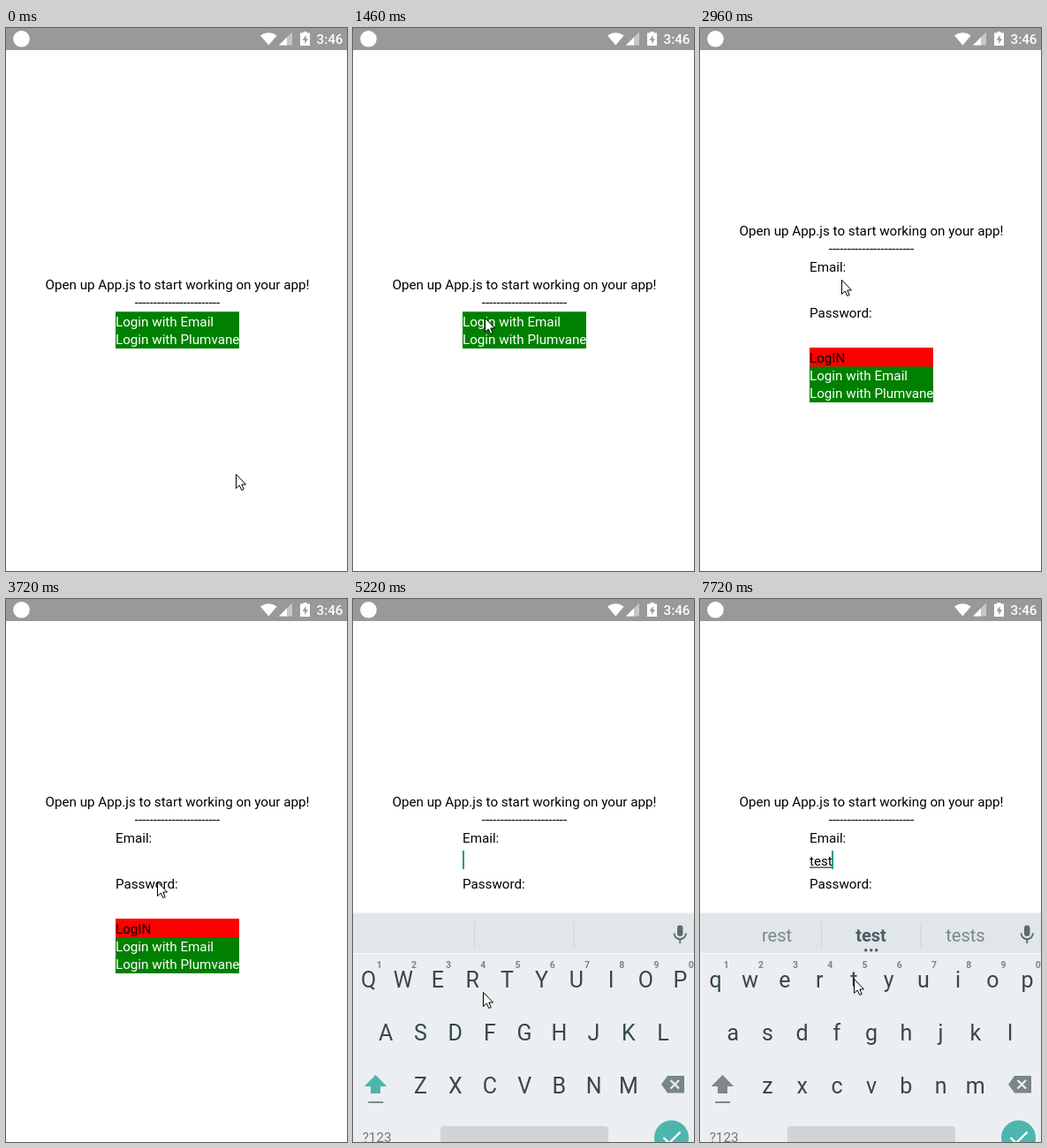
Write an HTML page that moves like this. It is 386 px wide and 615 px high and loops after 8000 ms.

```html
<!DOCTYPE html>
<html lang="en">
<head>
<meta charset="utf-8">
<title>Login form</title>
<style>
html, body { margin: 0; width: 100%; height: 100%; overflow: hidden; background: #fff; }
svg { display: block; width: 386px; height: 615px; font-family: Roboto, sans-serif; font-size: 15.2px; }
.mid { text-anchor: middle; }
.key { font-size: 25px; fill: #37474f; }
.hint { font-size: 10.5px; font-weight: 700; fill: #78868d; }
.word { font-size: 20px; fill: #78868d; }
</style>
</head>
<body>
<svg viewBox="0 0 386 615">
  <rect width="386" height="615" fill="#fff"/>

  <g id="status" fill="#fff">
    <rect width="386" height="25" fill="#999"/>
    <circle cx="17.5" cy="12.3" r="9.3"/>
    <path d="M288 8.500Q297.300 2 306.600 8.500L297.300 19.500Z"/>
    <path d="M324 4.500V19.500H309Z" fill-opacity=".45"/>
    <path d="M318 10.500V19.500H309Z"/>
    <path d="M336.500 4H340.500V5.500H344V20H333V5.500H336.500Z"/>
    <path d="M339.600 8L335.500 13.800H338.200V18L342 12.200H339.600Z" fill="#999"/>
    <text x="351.500" y="18" font-weight="500">3:46</text>
  </g>

  <g id="heading">
    <text class="mid" x="194" y="296">Open up App.js to start working on your app!</text>
    <text class="mid" x="194" y="316">-----------------------</text>
  </g>

  <g id="buttons" fill="#fff">
    <rect x="124" y="321.300" width="140" height="41.700" fill="#008000"/>
    <text x="124" y="338">Login with Email</text>
    <text x="124" y="358">Login with Plumvane</text>
  </g>

  <g id="form">
    <text x="124" y="276">Email:</text>
    <text x="124" y="327.500">Password:</text>
    <rect x="124" y="362" width="140" height="21.500" fill="#f00"/>
    <text x="124" y="379">LogIN</text>
    <text id="typed" x="124" y="302"></text>
    <rect id="under" x="124" y="303.500" height="1"/>
    <rect id="caret" y="285" width="2" height="21" fill="#159a86"/>
  </g>

  <g id="board">
    <defs>
      <linearGradient id="shade" x2="0" y2="1">
        <stop stop-color="#fff"/><stop offset="1" stop-color="#d9dee0"/>
      </linearGradient>
    </defs>
    <rect y="354" width="386" height="4" fill="url(#shade)"/>
    <rect y="358" width="386" height="43" fill="#e1e6e9"/>
    <rect y="401" width="386" height="214" fill="#eceff1"/>
    <rect y="401" width="386" height="1" fill="#f7f9f9"/>
    <path d="M137.500 366V395M250 366V395" stroke="#cdd3d6"/>
    <g id="mic" fill="none" stroke="#5b6970" stroke-width="1.900">
      <rect x="367" y="369.500" width="6.400" height="12.500" rx="3.200" fill="#5b6970" stroke="none"/>
      <path d="M363.500 378.500A6.700 6.700 0 0 0 376.900 378.500M370.200 385V390"/>
    </g>
    <g id="words" class="mid">
      <text class="word" x="87" y="388">rest</text>
      <text class="word" x="193.500" y="388" style="font-weight:700;fill:#4b5c64">test</text>
      <text class="word" x="300.500" y="388">tests</text>
      <g fill="#4b5c64">
        <circle cx="187.700" cy="397.700" r="1.700"/>
        <circle cx="193.700" cy="397.700" r="1.700"/>
        <circle cx="199.700" cy="397.700" r="1.700"/>
      </g>
    </g>
    <g id="keys" class="mid"></g>
    <path id="shift" d="M25.500 539L38.300 552H31V560H20V552H12.700Z"/>
    <rect x="17" y="569" width="17.500" height="2" rx="1" fill="#7d888d"/>
    <path d="M349 549.800L356 540H375V559.500H356Z" fill="#78868c"/>
    <path d="M359.500 545L369 554.500M369 545L359.500 554.500" stroke="#eceff1" stroke-width="2.200"/>
    <text x="10.700" y="615" fill="#6c7a81">?123</text>
    <rect x="99" y="597" width="190" height="30" rx="4" fill="#d0d4d6"/>
    <circle cx="360.500" cy="610" r="19.500" fill="#4db6ac"/>
    <path d="M351.500 610L357.800 616.300L370.500 603.600" fill="none" stroke="#fff" stroke-width="2.400"/>
  </g>

  <path id="mouse" d="M.5 .5V16.500L4.200 13L6.800 18.500L9.200 17.400L6.800 12H11.500Z" fill="#fff" stroke="#000"/>
</svg>
<script>
const LOOP = 8000;
const SHIFT = 61; // how far the form pushes its neighbours apart
const $ = id => document.getElementById(id);
const show = (id, on) => $(id).setAttribute('display', on ? 'inline' : 'none');
const move = (id, x, y) => $(id).setAttribute('transform', `translate(${x} ${y})`);

// Pointer path: step, x, y
const path = [
  [0, 260, 505], [1, 250, 487], [4, 156, 344], [5, 147, 330], [7, 150, 326],
  [9, 168, 280], [10, 167, 282], [12, 160, 285], [13, 160, 287], [15, 171, 320],
  [16, 176, 352], [18, 174, 386], [20, 150, 438], [21, 147, 445], [23, 172, 432],
  [24, 172, 432], [25, 173, 431], [27, 174, 430], [32, 174, 430]
];

function addText(cls, x, y, str) {
  const el = document.createElementNS('http://www.w3.org/2000/svg', 'text');
  el.setAttribute('class', cls);
  el.setAttribute('x', x);
  el.setAttribute('y', y);
  el.textContent = str;
  $('keys').append(el);
  return el;
}

const GAP = 39.22;
const letters = [['QWERTYUIOP', 17.5, 440], ['ASDFGHJKL', 37.2, 500], ['ZXCVBNM', 76.5, 560]]
  .flatMap(([row, x, y]) => [...row].map((c, i) => addText('key', x + i * GAP, y, c)));
[...'1234567890'].forEach((c, i) => addText('hint', 29.7 + i * GAP, 418, c));

// The screen refreshes about four times a second
function stepAt(t) {
  if (t < 1210) return Math.min(4, Math.floor(t / 250));
  if (t < 3720) return Math.min(14, 5 + Math.floor((t - 1210) / 250));
  return Math.min(31, 15 + Math.floor((t - 3720) / 250));
}

function pointer(step) {
  const i = path.findIndex(p => p[0] > step);
  const [s0, x0, y0] = path[i - 1], [s1, x1, y1] = path[i];
  const k = (step - s0) / (s1 - s0);
  return [x0 + (x1 - x0) * k, y0 + (y1 - y0) * k].map(Math.round);
}

let lower = null;
function setCase(on) {
  if (on === lower) return;
  lower = on;
  for (const el of letters) {
    const c = el.textContent;
    el.textContent = on ? c.toLowerCase() : c.toUpperCase();
  }
  $('shift').setAttribute('fill', on ? '#7d888d' : '#4db6ac');
}

function draw(t) {
  const step = stepAt(t);
  const open = step >= 7, typing = step >= 29;
  const text = typing ? ['t', 'tes', 'test'][step - 29] : '';

  move('heading', 0, open ? -SHIFT : 0);
  move('buttons', 0, open ? SHIFT : 0);
  show('form', open);
  show('board', step >= 16);
  show('words', typing);
  setCase(typing);

  $('typed').textContent = text;
  const width = text ? $('typed').getComputedTextLength() : 0;
  $('under').setAttribute('width', width);
  $('caret').setAttribute('x', 124 + Math.max(0, Math.round(width - 0.6)));
  show('caret', typing || (step >= 13 && (step - 13) % 4 < 2));
  move('mouse', ...pointer(step));
}

const start = performance.now();
function tick() {
  draw((performance.now() - start) % LOOP);
  requestAnimationFrame(tick);
}
tick();
</script>
</body>
</html>
```
